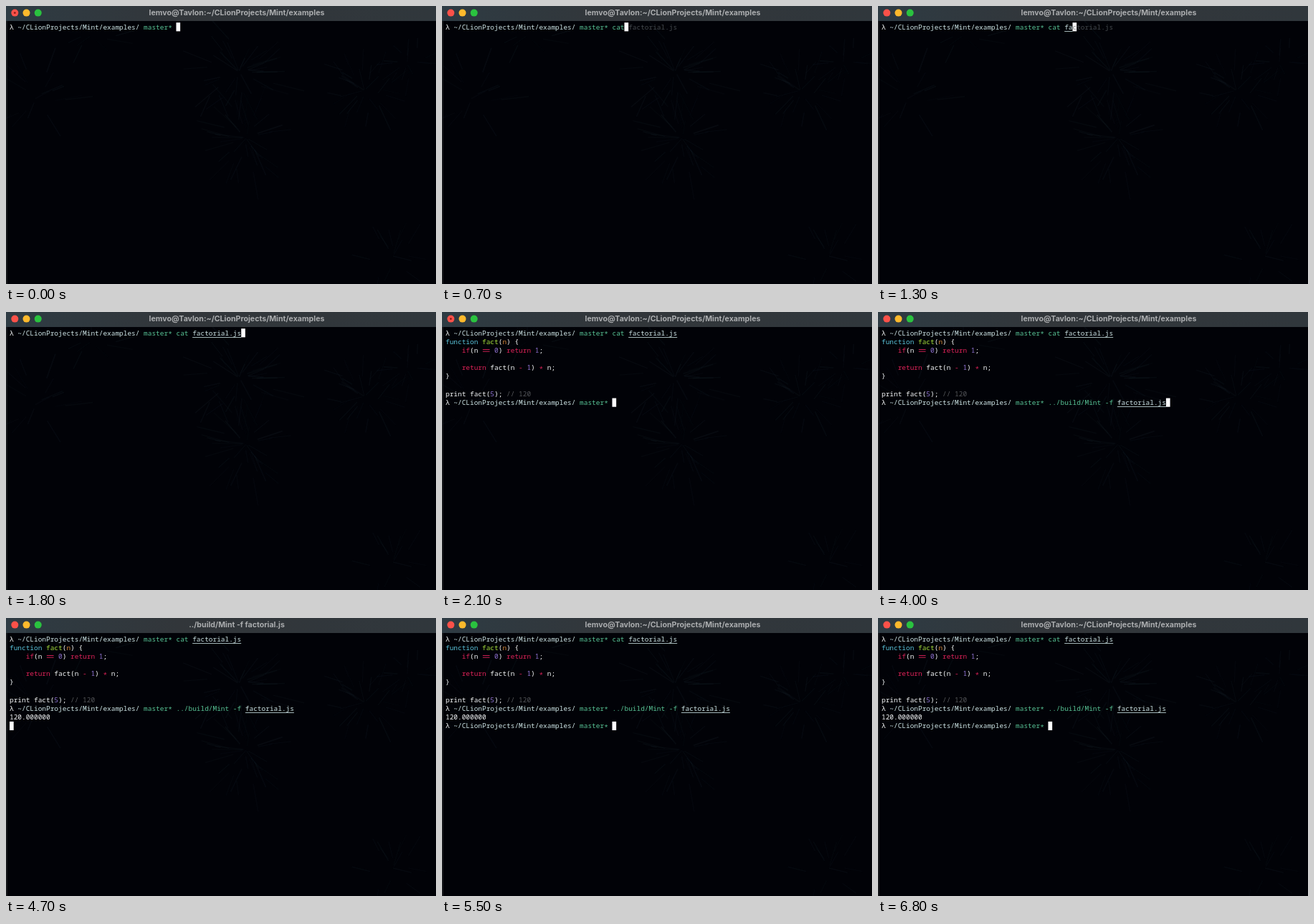
Write an HTML page with a canvas that moves like this. It is 600 px wide and 389 px high and loops after 6.9 s.

```html
<!DOCTYPE html>
<html lang="en">
<head>
<meta charset="utf-8">
<title>Terminal</title>
<style>
  html, body { margin: 0; width: 100%; height: 100%; overflow: hidden; background: #010207; }
  canvas { display: block; }
</style>
</head>
<body>
<canvas id="stage" width="600" height="389"></canvas>
<script>
const LOOP = 6900, W = 600, H = 389, BAR = 21;
const LEFT = 5, TOP = 23.2, COL = 5.67, ROW = 12.17;
const WHITE = '#fafcfc', TEXT = '#cfe6e6', GREEN = '#58c496', DIM = '#454a4e';
const RED = '#e0235a', PURPLE = '#8f72d0', CYAN = '#5cc6dc', LIME = '#a6e03c', ORANGE = '#dd8c3a';
const HOME_TITLE = 'lemvo@Tavlon:~/CLionProjects/Mint/examples';

const ctx = document.getElementById('stage').getContext('2d');

const PROMPT = [['λ ', WHITE], ['~/CLionProjects/Mint/examples/ ', TEXT], ['master* ', GREEN]];
const LISTING = [
  [['function ', CYAN], ['fact', LIME], ['(', WHITE], ['n', ORANGE], [') {', WHITE]],
  [['    if', RED], ['(n ', WHITE], ['== ', RED], ['0', PURPLE], [') ', WHITE], ['return ', RED], ['1', PURPLE], [';', WHITE]],
  [],
  [['    return ', RED], ['fact(n ', WHITE], ['- ', RED], ['1', PURPLE], [') ', WHITE], ['* ', RED], ['n;', WHITE]],
  [['}', WHITE]],
  [],
  [['print fact(', WHITE], ['5', PURPLE], ['); ', WHITE], ['// 120', '#55575a']]
];

// keys: [time, number of characters entered]
const CAT = {
  text: 'cat factorial.js', valid: 3, enter: 1900, output: 1900, done: 2000, lines: LISTING,
  keys: [[400, 1], [500, 2], [700, 3], [900, 4], [1000, 5], [1200, 6], [1500, 16]]
};
const RUN = {
  text: '../build/Mint -f factorial.js', valid: 1, enter: 4400, output: 4500, done: 4900,
  lines: [[['120.000000', WHITE]]],
  keys: [[2900, 1], [3000, 2], [3200, 3], [3700, 29]]
};

function seeded(seed) {
  return () => (seed = (seed * 16807) % 2147483647) / 2147483647;
}

// Faint pine needles hanging from a few twigs.
function makeBackdrop() {
  const layer = document.createElement('canvas');
  layer.width = W;
  layer.height = H;
  const g = layer.getContext('2d'), random = seeded(71);
  g.fillStyle = '#010207';
  g.fillRect(0, 0, W, H);
  const twigs = [[325, 92, 90, 40], [500, 118, 75, 32], [335, 185, 85, 36], [40, 130, 80, 16],
    [120, 40, 75, 12], [560, 80, 60, 14], [540, 350, 70, 14]];
  for (const [x, y, reach, count] of twigs) {
    for (let i = 0; i < count; i++) {
      const angle = random() * Math.PI * 2;
      const start = reach * random() * 0.6, end = start + reach * (0.2 + random() * 0.3);
      const bend = angle + (random() - 0.5) * 0.4;
      g.strokeStyle = `rgba(34, 50, 58, ${0.06 + random() * 0.12})`;
      g.lineWidth = 1 + random();
      g.beginPath();
      g.moveTo(x + Math.cos(bend) * start, y + Math.sin(bend) * start);
      g.lineTo(x + Math.cos(angle) * end, y + Math.sin(angle) * end);
      g.stroke();
    }
  }
  return layer;
}
const backdrop = makeBackdrop();

const barFill = ctx.createLinearGradient(0, 0, W, 0);
barFill.addColorStop(0, '#2e3b43');
barFill.addColorStop(0.4, '#32363a');
barFill.addColorStop(1, '#30373c');

function drawRun(text, col, row, color, underline) {
  const x = LEFT + col * COL, y = TOP + row * ROW;
  ctx.fillStyle = color;
  if (text.startsWith('==')) {
    ctx.fillRect(x + 0.8, y + 4.5, 2 * COL - 1.6, 0.9);
    ctx.fillRect(x + 0.8, y + 7.2, 2 * COL - 1.6, 0.9);
  } else {
    // The asterisk sits at mid-height.
    [...text].forEach((char, i) =>
      ctx.fillText(char, x + i * COL, y + (char === '*' ? 10.8 : 9.3)));
  }
  if (underline) ctx.fillRect(x, Math.round(y + 11.4), text.length * COL, 0.8);
}

function drawLine(runs, row) {
  let col = 0;
  for (const [text, color] of runs) {
    drawRun(text, col, row, color);
    col += text.length;
  }
  return col;
}

function drawCursor(col, row, char = '', color = '#888') {
  ctx.fillStyle = '#fff';
  ctx.fillRect(LEFT + col * COL, TOP + row * ROW, COL, ROW);
  drawRun(char, col, row, color);
}

function drawCommand({ text, valid, keys, enter }, col, row, t) {
  const count = keys.reduce((n, [time, length]) => t >= time ? length : n, 0);
  const typed = text.slice(0, count);
  let at = col;
  typed.split(' ').forEach((word, i) => {
    const isFile = i > 0 && !word.startsWith('-');
    const color = isFile ? TEXT : i === 0 && count < valid ? RED : GREEN;
    drawRun(word, at, row, color, isFile || word.endsWith('/'));
    at += word.length + 1;
  });
  if (t >= enter) return;
  if (count) drawRun(text.slice(count), col + count, row, DIM);
  const inName = count < text.indexOf(' ');
  drawCursor(col + count, row, count ? text.charAt(count) : '', inName ? '#b5483c' : '#888');
}

function drawTerminal(t) {
  ctx.font = '500 9.45px "Noto Sans Mono", monospace';
  ctx.textAlign = 'left';
  let row = 0;
  for (const command of [CAT, RUN]) {
    const col = drawLine(PROMPT, row);
    drawCommand(command, col, row, t);
    if (t < command.enter) return;
    row++;
    if (t >= command.output) command.lines.forEach(line => drawLine(line, row++));
    if (t < command.done) return drawCursor(0, row);
  }
  drawCursor(drawLine(PROMPT, row), row);
}

function disc(x, y, radius, color) {
  ctx.fillStyle = color;
  ctx.beginPath();
  ctx.arc(x, y, radius, 0, Math.PI * 2);
  ctx.fill();
}

function drawTitleBar(t) {
  ctx.fillStyle = barFill;
  ctx.fillRect(0, 0, W, BAR);
  ctx.fillStyle = '#2a2c2e';
  ctx.fillRect(0.5, BAR, 1, H - BAR);
  ['#fb5149', '#fdb92c', '#2ac23f'].forEach((color, i) => disc(12.3 + i * 16.2, 9.6, 5, color));
  if (t < 700 || (t >= 2000 && t < 2500)) disc(12.3, 9.6, 1.4, '#8a1814');
  const active = [CAT, RUN].find(c => t >= c.enter && t < c.done);
  ctx.font = '700 10.6px Inter, sans-serif';
  ctx.textAlign = 'center';
  ctx.fillStyle = '#abadaf';
  ctx.fillText(active ? active.text : HOME_TITLE, 322, 13.3);
}

function frame() {
  const t = performance.now() % LOOP;
  ctx.drawImage(backdrop, 0, 0);
  drawTitleBar(t);
  drawTerminal(t);
  requestAnimationFrame(frame);
}
frame();
</script>
</body>
</html>
```
